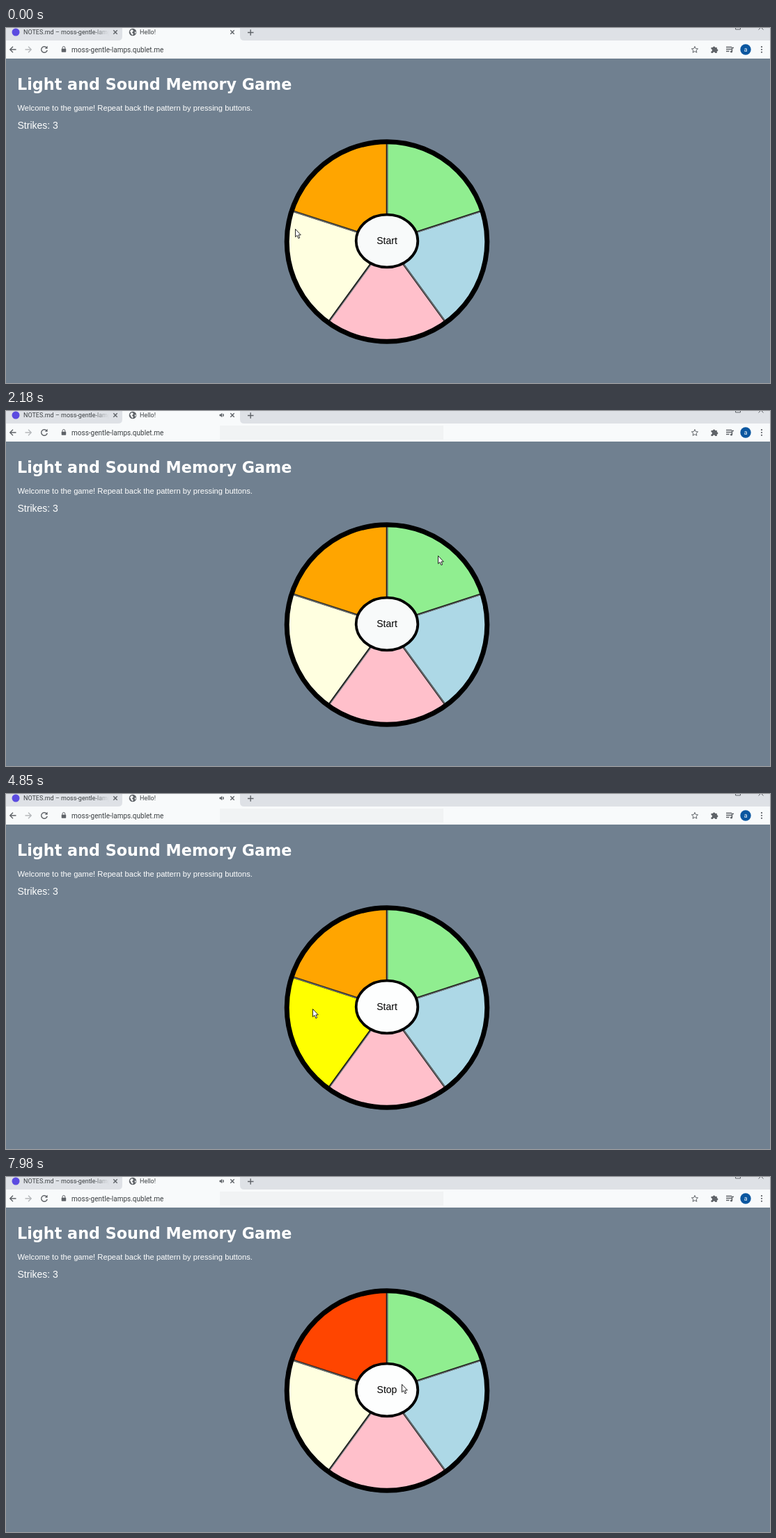
Recreate the animation shown at these times as an HTML page. Size 1097x511 px, loop 8000 ms.

```html
<!DOCTYPE html>
<html lang="en">
<head>
<meta charset="utf-8">
<title>Light and Sound Memory Game</title>
<style>
html, body { margin: 0; width: 100%; height: 100%; overflow: hidden; background: #708090; }
svg { display: block; }
text { font-family: "Liberation Sans", Arial, sans-serif; }
.ui text { font-family: Roboto, sans-serif; fill: #3c4043; }
.icon { fill: none; stroke: #5f6368; stroke-width: 1.4; }
.page text { fill: #fff; }
.page .title { font: bold 22.3px "DejaVu Sans", Verdana, sans-serif; }
.label { font-size: 14px; text-anchor: middle; }

/* One shared 8 s clock; every change is a hard step. */
.orange, .green, .blue, .pink, .yellow, .hub, .start, .stop, .sound, .cursor {
  animation: 8s step-end infinite;
}
.orange { animation-name: orange; }
.green { animation-name: green; }
.blue { animation-name: blue; }
.pink { animation-name: pink; }
.yellow { animation-name: yellow; }
.hub { animation-name: hub; }
.start { animation-name: start; }
.stop { animation-name: stop; }
.sound { animation-name: sound; }
.cursor { animation-name: cursor; }

@keyframes orange {
  0%, 13% { fill: orange; }
  11.125%, 90.875%, 100% { fill: orangered; }
}
@keyframes green {
  0%, 27.25%, 100% { fill: lightgreen; }
  25.375% { fill: green; }
}
@keyframes blue {
  0%, 46.125%, 100% { fill: lightblue; }
  37.5% { fill: blue; }
}
@keyframes pink {
  0%, 49.25%, 100% { fill: pink; }
  47.75% { fill: red; }
}
@keyframes yellow {
  0%, 64.125%, 100% { fill: lightyellow; }
  60.625% { fill: yellow; }
}
@keyframes hub {
  0% { fill: #f8fafa; }
  46.125%, 100% { fill: #fdfefe; }
}
@keyframes start {
  0% { opacity: 1; }
  78.5%, 100% { opacity: 0; }
}
@keyframes stop {
  0% { opacity: 0; }
  78.5%, 100% { opacity: 1; }
}
@keyframes sound {
  0% { opacity: 0; }
  19.75%, 100% { opacity: 1; }
}
@keyframes cursor {
  0% { transform: translate(415px, 289px); }
  1.5% { transform: translate(420px, 281px); }
  3% { transform: translate(431px, 263px); }
  4.5% { transform: translate(442px, 246px); }
  6.375% { transform: translate(455px, 229px); }
  7.875% { transform: translate(471px, 213px); }
  9.375% { transform: translate(482px, 205px); }
  14.875% { transform: translate(515px, 206px); }
  16.375% { transform: translate(565px, 206px); }
  17.875% { transform: translate(609px, 207px); }
  19.75% { transform: translate(620px, 208px); }
  28.75% { transform: translate(629px, 216px); }
  30.625% { transform: translate(656px, 274px); }
  32.125% { transform: translate(677px, 337px); }
  34% { transform: translate(677px, 343px); }
  39.375% { transform: translate(655px, 372px); }
  40.875% { transform: translate(618px, 389px); }
  42.375% { transform: translate(585px, 395px); }
  44.25% { transform: translate(560px, 404px); }
  46.125% { transform: translate(559px, 406px); }
  50.75% { transform: translate(525px, 378px); }
  52.25% { transform: translate(483px, 341px); }
  54.125% { transform: translate(465px, 325px); }
  55.625% { transform: translate(450px, 313px); }
  57.125% { transform: translate(440px, 309px); }
  67.625% { transform: translate(454px, 305px); }
  69.5% { transform: translate(500px, 300px); }
  71% { transform: translate(542px, 298px); }
  83.875% { transform: translate(556px, 298px); }
  85.375% { transform: translate(569px, 299px); }
  99.75%, 100% { transform: translate(568px, 298px); }
}
</style>
</head>
<body>
<svg width="1097" height="511" viewBox="0 0 1097 511">
  <defs>
    <linearGradient id="fade">
      <stop offset="0" stop-color="#dee1e6" stop-opacity="0"/>
      <stop offset="1" stop-color="#dee1e6"/>
    </linearGradient>
    <path id="cross" d="M-2.7 -2.7L2.7 2.7M2.7 -2.7L-2.7 2.7"/>
    <path id="spokes" d="M547 307.5V163.5M547 307.5L683.95 263M547 307.5L631.64 424M547 307.5L462.36 424M547 307.5L410.05 263"/>
  </defs>
  <rect width="1097" height="511" fill="#708090"/>

  <g class="ui">
    <rect width="1097" height="18" fill="#dee1e6"/>
    <rect y="18" width="1097" height="26" fill="#f8fafb"/>
    <path d="M161 18Q167 18 167 12V0H336V12Q336 18 342 18Z" fill="#f8fafb"/>

    <circle cx="14" cy="6" r="5.5" fill="#5b4be0"/>
    <text x="25" y="9" font-size="9">NOTES.md – moss-gentle-lamp-v</text>
    <rect x="125" width="23" height="14" fill="url(#fade)"/>
    <rect x="148" width="13" height="14" fill="#dee1e6"/>
    <circle cx="182" cy="6" r="5.3" fill="#5f6368"/>
    <path d="M178 4.5L181 2L183 4L181 6.5L183 8.5L181.5 10.5L179.5 8ZM184.5 5.5H187L185.5 8.5Z" fill="#f8fafb"/>
    <text x="192" y="9" font-size="9">Hello!</text>
    <g class="icon">
      <use href="#cross" x="157" y="6"/>
      <use href="#cross" x="325" y="6"/>
      <path d="M347 6.500H355.500M351.200 2.300V10.700"/>
      <path d="M1047.500 0V2H1054.500V0M1080.500 2.500L1084 -1L1087.500 2.500" stroke-width="1"/>
    </g>
    <g class="sound">
      <rect x="307" y="21" width="321" height="20" fill="#f1f3f4"/>
      <path d="M306.500 4.800H308L310.300 2.800V9.200L308 7.200H306.500Z" fill="#5f6368"/>
      <path class="icon" d="M311.500 4.300Q313 6 311.500 7.700" stroke-width="1"/>
    </g>

    <g class="icon">
      <path d="M14.500 31H6M10 26.800L5.800 31L10 35.200"/>
      <path d="M27.500 31H36M32 26.800L36.200 31L32 35.200" stroke="#b5b8bb" style="stroke:#b5b8bb"/>
      <path d="M58.300 28.200A4.300 4.300 0 1 0 59.200 32"/>
      <path d="M81 30V28.500A1.900 1.900 0 0 1 84.800 28.500V30" stroke-width="1"/>
      <path d="M989 26.500L990.300 29.600L993.600 29.900L991.100 32.100L991.900 35.300L989 33.600L986.100 35.300L986.900 32.100L984.400 29.900L987.700 29.600Z" stroke-width="1"/>
      <path d="M1034 27.500H1042M1034 30.500H1042M1034 33.500H1038.500M1042.500 34V28.500H1045"/>
    </g>
    <g fill="#5f6368">
      <path d="M55.700 29.700H59.600V25.800Z"/>
      <rect x="79.700" y="29.700" width="6.500" height="5" rx=".8"/>
      <path d="M1012.500 28H1015A1.600 1.600 0 0 1 1018.200 28H1020.800V30.300A1.600 1.600 0 0 1 1020.800 33.500V36H1018.200A1.600 1.600 0 0 0 1015 36H1012.500V33.500A1.600 1.600 0 0 0 1012.500 30.300Z"/>
      <circle cx="1041.500" cy="34" r="1.600"/>
      <circle cx="1085" cy="27.200" r="1.100"/>
      <circle cx="1085" cy="31" r="1.100"/>
      <circle cx="1085" cy="34.800" r="1.100"/>
    </g>
    <text x="94" y="34.500" font-size="10">moss-gentle-lamps.qublet.me</text>
    <circle cx="1062" cy="31" r="7.700" fill="#0b57a0"/>
    <text x="1062" y="33.500" font-size="8.500" text-anchor="middle" style="fill:#fff">a</text>
  </g>

  <g class="page">
    <text class="title" x="16" y="89">Light and Sound Memory Game</text>
    <text x="16.500" y="118.500" font-size="11.200">Welcome to the game! Repeat back the pattern by pressing buttons.</text>
    <text x="16.500" y="145" font-size="14">Strikes: 3</text>
  </g>

  <g class="wheel">
    <path class="green" d="M547 307.500V163.500A144 144 0 0 1 683.950 263Z"/>
    <path class="blue" d="M547 307.500L683.950 263A144 144 0 0 1 631.640 424Z"/>
    <path class="pink" d="M547 307.500L631.640 424A144 144 0 0 1 462.360 424Z"/>
    <path class="yellow" d="M547 307.500L462.360 424A144 144 0 0 1 410.050 263Z"/>
    <path class="orange" d="M547 307.500L410.050 263A144 144 0 0 1 547 163.500Z"/>
    <use href="#spokes" stroke="#1c1c1c" stroke-width="2.600"/>
    <use href="#spokes" x=".8" y=".6" stroke="#7b8084" stroke-width="1.100"/>
    <circle cx="547" cy="307.500" r="143.800" fill="none" stroke="#000" stroke-width="7"/>
    <ellipse class="hub" cx="547" cy="306.500" rx="44.300" ry="37.800" stroke="#000" stroke-width="3.800"/>
    <text class="label start" x="547" y="311">Start</text>
    <text class="label stop" x="547" y="311">Stop</text>
  </g>

  <path class="cursor" d="M.5 .5V11.800L3 9.500L4.900 13.800L6.700 13L4.900 8.900H8.300Z" fill="#fff" stroke="#111" stroke-width=".9"/>
</svg>
</body>
</html>
```
